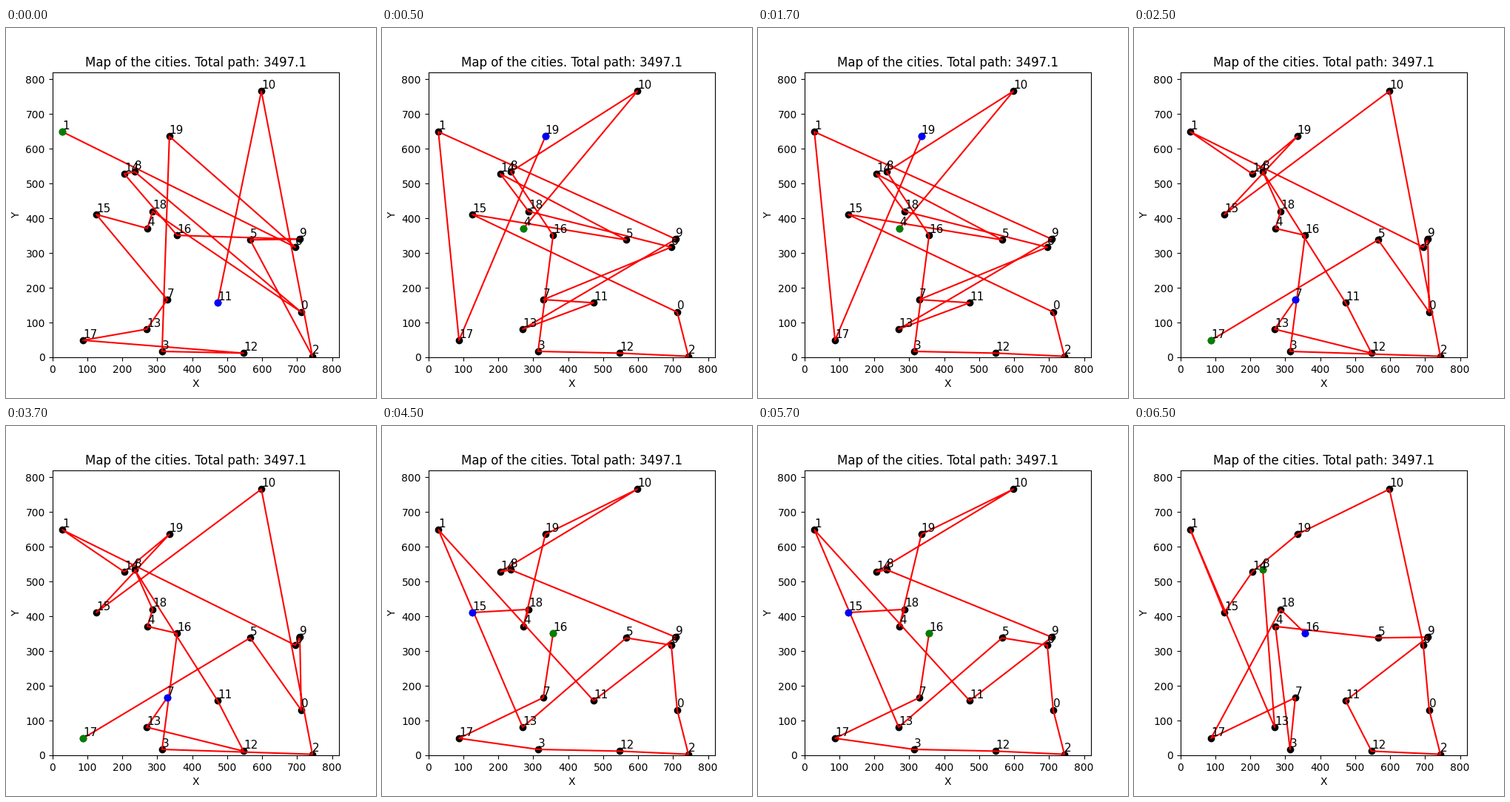
These frames come from a looping animation (500 px wide and 500 px high, 8000 ms). A matplotlib script:

```python
import matplotlib.pyplot as plt
import numpy as np
from matplotlib.animation import FuncAnimation

STEP_MS = 500
FRAMES = 16

CITIES = np.array([
    (712, 130), (29, 649), (744, 3), (314, 17), (272, 371),
    (566, 338), (695, 317), (329, 166), (236, 534), (708, 340),
    (598, 766), (473, 157), (547, 12), (270, 81), (206, 528),
    (126, 411), (357, 351), (88, 49), (287, 420), (335, 636),
])

# Each tour names only its long jumps; a dot walks to the nearest unvisited city.
JUMPS = (
    "1 6 19 3 12 17 . . 15 4 . 0 8 . . 9 . 2 10 .",
    "4 10 8 16 3 12 2 . 15 5 14 . 6 7 11 . 9 1 17 .",
    "17 5 0 9 . 1 . 19 15 10 2 3 16 . . . 11 12 13 .",
    "16 7 17 3 12 2 . . 5 13 1 11 9 8 . 10 . 4 . .",
    "8 13 1 15 . 19 10 6 0 . . . 9 . 4 3 . 17 18 .",
)


def nearest_unvisited(tour):
    here = CITIES[tour[-1]]
    unvisited = set(range(len(CITIES))) - set(tour)
    return min(unvisited, key=lambda city: np.hypot(*(CITIES[city] - here)))


def build_tour(jumps):
    tour = []
    for jump in jumps.split():
        tour.append(nearest_unvisited(tour) if jump == "." else int(jump))
    return tour


TOURS = [build_tour(jumps) for jumps in JUMPS]

fig, ax = plt.subplots(figsize=(5, 5), dpi=100)
ax.set(xlim=(0, 820), ylim=(0, 820), xlabel="X", ylabel="Y",
       title="Map of the cities. Total path: 3497.1")

ax.plot(*CITIES.T, "ko")
path, = ax.plot([], [], "r-")
start, = ax.plot([], [], "go")
end, = ax.plot([], [], "bo")
for number, (x, y) in enumerate(CITIES):
    ax.text(x, y + 1, str(number), fontsize=11, va="bottom")


def update(frame):
    # The first tour shows for one step, each later one for four.
    points = CITIES[TOURS[(frame + 3) // 4]]
    path.set_data(*points.T)
    start.set_data(*points[:1].T)
    end.set_data(*points[-1:].T)
    return path, start, end


anim = FuncAnimation(fig, update, frames=FRAMES, interval=STEP_MS,
                     repeat=True, repeat_delay=0)
plt.show()
```
